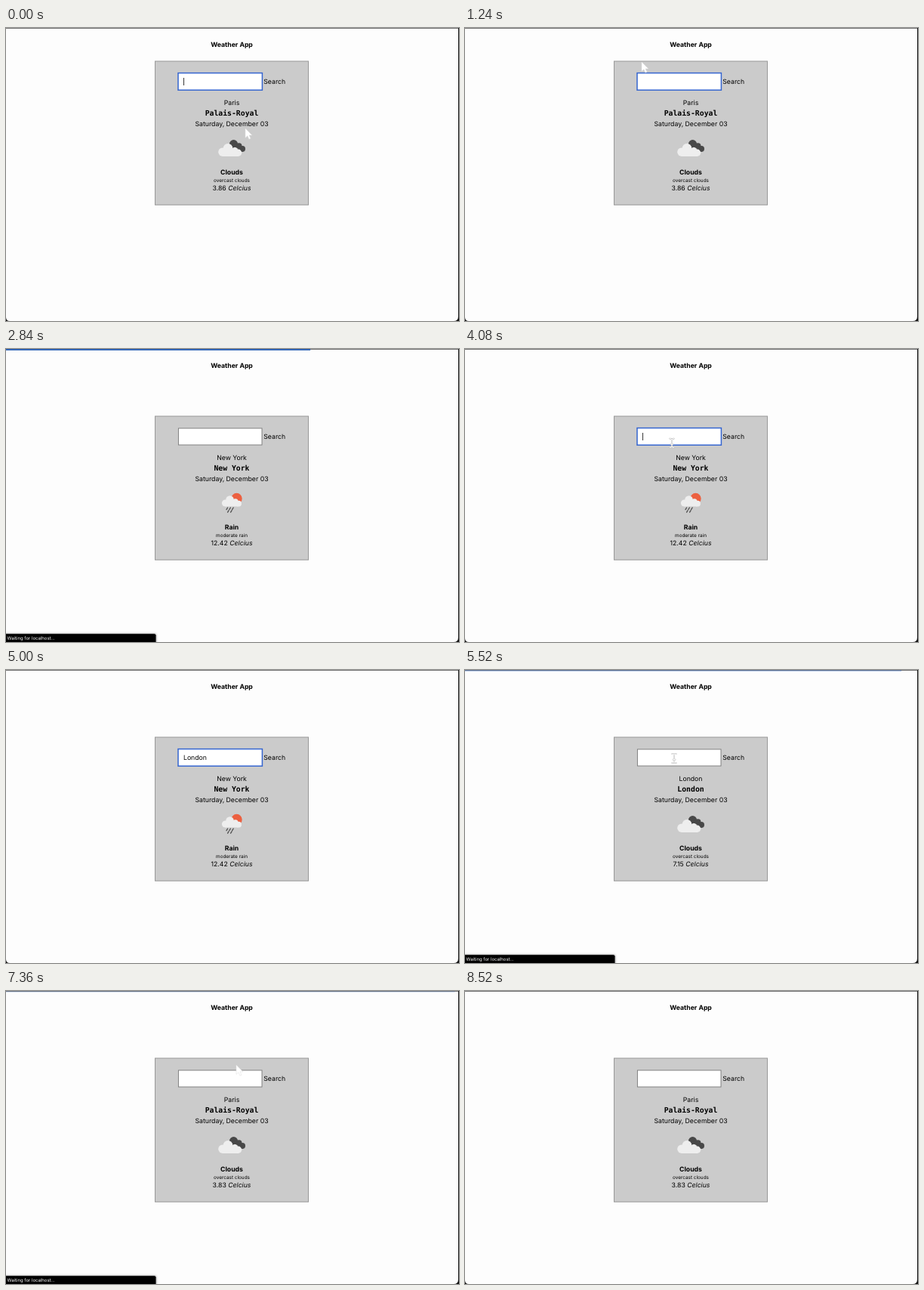
An HTML page that plays this animation: 600x388 px, repeating every 9.16 s.

```html
<!DOCTYPE html>
<html lang="en">
<head>
<meta charset="utf-8">
<title>Weather App</title>
<style>
  html, body { margin: 0; width: 100%; height: 100%; overflow: hidden; background: #fdfdfd; }
  svg { display: block; width: 100vw; height: 100vh; }
  text { font: 8.7px Inter, sans-serif; white-space: pre; text-rendering: geometricPrecision; }
  .mid { text-anchor: middle; }
  .bold { font-weight: 700; }
  .small { font-size: 6.4px; }
  .mono { font: 700 9.77px "DejaVu Sans Mono", monospace; }
  .status { font-size: 6px; fill: #fff; }
  .italic { font-style: italic; }
</style>
</head>
<body>
<svg viewBox="0 0 600 388">
  <defs>
    <filter id="soft" x="-10%" y="-60%" width="120%" height="220%"><feGaussianBlur stdDeviation="1.6"/></filter>
  </defs>
  <rect width="600" height="388" fill="#111"/>
  <rect width="599" height="1" fill="#777"/>
  <path d="M0 1H599V382q0 6-6 6H5q-5 0-5-5z" fill="#fdfdfd"/>
  <text class="mid bold" x="299" y="25.2">Weather App</text>

  <g id="card">
    <rect x="197.5" y="44" width="203" height="190.2" fill="#cbcbcb" stroke="#989898"/>
    <rect id="field" fill="#fff"/>
    <text id="typed" x="235" y="74.2"></text>
    <rect id="caret" y="66" width="0.9" height="10" fill="#222"/>
    <text x="341.3" y="74.2">Search</text>
    <text class="mid" id="city" x="299" y="102"></text>
    <text class="mid mono" id="place" x="299" y="116.2"></text>
    <text class="mid" x="299" y="130.2">Saturday, December 03</text>
    <g id="clouds">
      <g fill="#484848">
        <circle cx="301.5" cy="153.7" r="5.6"/><circle cx="308.5" cy="156.3" r="4"/>
        <circle cx="313" cy="160" r="4"/><path d="M300 155h9l4 9h-13z"/>
      </g>
      <g fill="#eee">
        <circle cx="287" cy="164.2" r="5.8"/><circle cx="294" cy="159.2" r="6.2"/>
        <circle cx="303" cy="162.3" r="4.4"/><circle cx="307.5" cy="165.3" r="4.7"/>
        <path d="M287 160h16l5 5v5h-21z"/>
      </g>
    </g>
    <g id="rain">
      <circle cx="305.5" cy="153" r="7.2" fill="#ec6040"/>
      <g fill="#eee">
        <circle cx="290.5" cy="159" r="4.6"/><circle cx="296.5" cy="154.6" r="5.3"/>
        <circle cx="303.8" cy="157" r="3.8"/><circle cx="308" cy="159.7" r="3.9"/>
        <path d="M290.5 156h13l4.5 3v4.6h-17.5z"/>
      </g>
      <path d="M293.6 165l-1.6 2.6M297.4 165l-1.6 2.6M301.2 165l-1.6 2.6M295 168.8l-1.4 2.4M299 168.8l-1.4 2.4"
            stroke="#505050" stroke-width="1.3" stroke-linecap="round"/>
    </g>
    <text class="mid bold" id="sky" x="299" y="193.7"></text>
    <text class="mid small" id="detail" x="299" y="203.8"></text>
    <text class="mid" x="299" y="215.2"><tspan id="degrees"></tspan> <tspan class="italic">Celcius</tspan></text>
  </g>

  <g id="status">
    <rect x="-4" y="377" width="203" height="15" rx="2" fill="#000" opacity=".4" filter="url(#soft)"/>
    <path d="M0 377.3H196.5q2 0 2 2V388H0z" fill="#000"/>
    <text class="status" x="1.6" y="385">Waiting for localhost...</text>
  </g>
  <rect id="bar" height="1.8" fill="#255cb4"/>

  <path id="arrow" d="M0 0V12.4L2.9 9.7L4.9 14.2L7 13.3L5 8.9H8.9z" fill="#fff" stroke="#dedede" stroke-width=".5"/>
  <g id="beam" fill="none" stroke-linecap="round">
    <path id="beamShape" d="M-2.6-6Q0-6 0-4.4Q0-6 2.6-6M0-4.4V4.4M-2.6 6Q0 6 0 4.4Q0 6 2.6 6M-1.4 1.6H1.4" stroke="#bdbdbd" stroke-width="1.7"/>
    <use href="#beamShape"/>
    <path d="M-2.6-6Q0-6 0-4.4Q0-6 2.6-6M0-4.4V4.4M-2.6 6Q0 6 0 4.4Q0 6 2.6 6M-1.4 1.6H1.4" stroke="#fff" stroke-width=".9"/>
  </g>
</svg>
<script>
const LOOP = 9160, STEP = 40, BLINK = 200, SHIFT = 45;
const $ = id => document.getElementById(id);
const clamp = v => Math.max(0, Math.min(1, v));
const show = (el, on) => el.setAttribute("display", on ? "inline" : "none");
const attrs = (el, map) => { for (const k in map) el.setAttribute(k, map[k]); };

const reports = [
  { city: "Paris", place: "Palais-Royal", sky: "Clouds", detail: "overcast clouds", degrees: "3.86" },
  { city: "New York", place: "New York", sky: "Rain", detail: "moderate rain", degrees: "12.42" },
  { city: "London", place: "London", sky: "Clouds", detail: "overcast clouds", degrees: "7.15" },
  { city: "Paris", place: "Palais-Royal", sky: "Clouds", detail: "overcast clouds", degrees: "3.83" }
];

// focus: field clicked, keys: key presses, send: form submitted, swap: new page, done: status gone
const searches = [
  { focus: -160, word: "New York", keys: [1400, 1480, 1600, 1680, 1760, 1880, 1960, 2080], send: 2480, swap: 2800, done: 3000 },
  { focus: 4000, word: "London", keys: [4320, 4400, 4480, 4600, 4720, 4800], send: 5080, swap: 5400, done: 5640 },
  { focus: 5640, word: "Paris", keys: [6280, 6400, 6520, 6680, 6720], send: 6920, swap: 7220, done: 7440 }
];

// Pointer strokes: [time, x, y]; the pointer is hidden between strokes.
const strokes = [
  [[0, 317, 133], [200, 390, 181], [420, 519, 110], [620, 400, 24], [840, 234, 45], [1400, 234, 45]],
  [[3720, 302, 187], [3840, 290, 158], [4000, 274, 125], [4320, 274, 122]],
  [[5480, 277, 117], [5520, 277, 117], [5640, 276, 122], [6280, 276, 122]],
  [[7200, 277, 122], [7360, 305, 98], [7600, 292, 140], [7840, 262, 180], [8000, 240, 165], [8240, 380, 95], [8520, 512, -14]]
];

function pointerAt(t) {
  const path = strokes.find(s => t >= s[0][0] && t < s[s.length - 1][0]);
  if (!path) return null;
  const i = path.findIndex((p, n) => n && t < p[0]);
  const [t0, x0, y0] = path[i - 1], [t1, x1, y1] = path[i];
  const k = (t - t0) / (t1 - t0), e = k * k * (3 - 2 * k);
  return [x0 + (x1 - x0) * e, y0 + (y1 - y0) * e];
}

function drawField(t) {
  const search = searches.find(s => t >= s.focus && t < s.swap);
  const pressed = search ? search.keys.filter(k => k <= t) : [];
  attrs($("field"), search
    ? { x: 228, y: 59.6, width: 111.4, height: 22.6, stroke: "#3565cf", "stroke-width": 1.5 }
    : { x: 228.4, y: 60, width: 110.6, height: 22, stroke: "#777", "stroke-width": 0.9 });
  $("typed").textContent = search ? search.word.slice(0, pressed.length) : "";
  const since = search ? t - (pressed[pressed.length - 1] ?? search.focus) : 0;
  const caretOn = search && Math.floor(since / BLINK) % 2 === 0;
  show($("caret"), caretOn);
  if (caretOn) $("caret").setAttribute("x", 235 + (pressed.length ? $("typed").getComputedTextLength() : 0));
}

function drawLoading(t) {
  const load = searches.find(s => t >= s.send && t < s.done);
  show($("status"), load);
  show($("bar"), load);
  if (!load) return;
  $("status").setAttribute("opacity", Math.min(clamp((t - load.send + STEP) / 80), clamp((load.done - t) / 80)));
  const dt = t - load.swap;
  const width = dt < 0 ? 250 * clamp((dt + 140) / 140) : 600 - 350 * (1 - clamp(dt / 160)) ** 2;
  attrs($("bar"), { width, opacity: 1 - clamp((dt - 50) / 110) });
}

function drawPointer(t, shift) {
  const p = pointerAt(t);
  const inField = p && p[0] > 228 && p[0] < 339 && p[1] > 60 + shift && p[1] < 83 + shift;
  show($("arrow"), p && !inField);
  show($("beam"), inField);
  if (p) (inField ? $("beam") : $("arrow")).setAttribute("transform", `translate(${p[0]} ${p[1]})`);
}

function render(t) {
  const page = searches.filter(s => t >= s.swap).length;
  const shift = page ? SHIFT : 0;
  const report = reports[page];
  for (const key in report) $(key).textContent = report[key];
  show($("rain"), report.sky === "Rain");
  show($("clouds"), report.sky === "Clouds");
  $("card").setAttribute("transform", `translate(0 ${shift})`);
  drawField(t);
  drawLoading(t);
  drawPointer(t, shift);
}

const start = performance.now();
function tick() {
  const t = (performance.now() - start) % LOOP;
  render(Math.floor(t / STEP) * STEP);
  requestAnimationFrame(tick);
}
tick();
</script>
</body>
</html>
```
